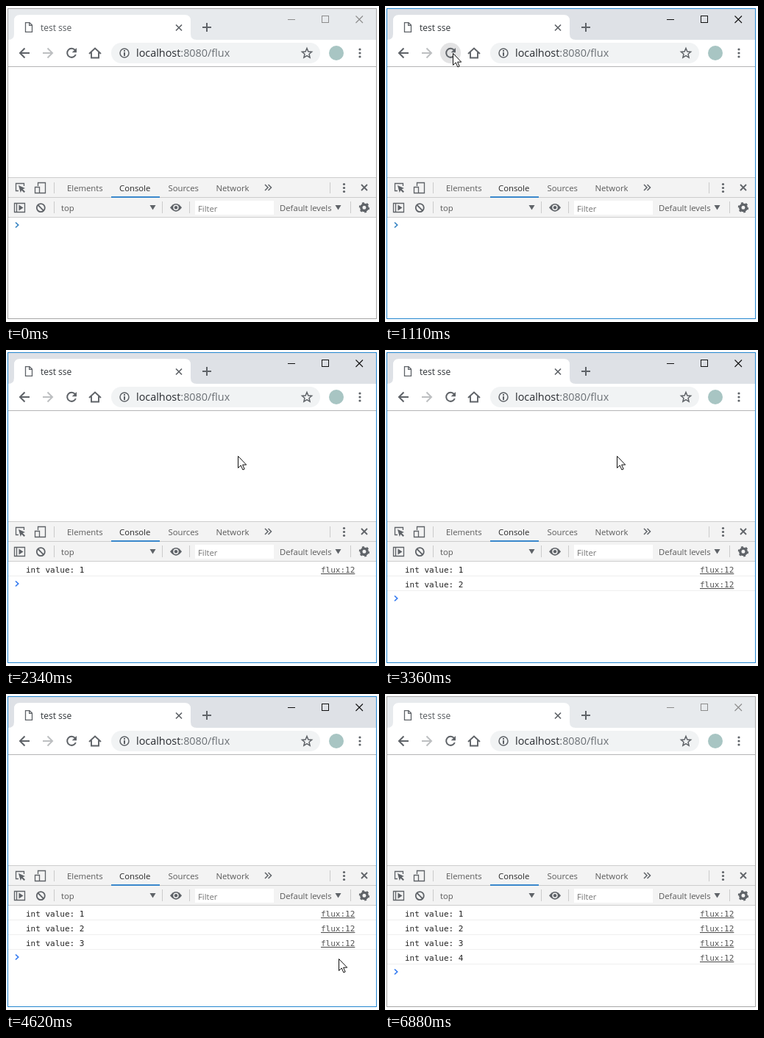
Write an HTML page that moves like this. It is 507 px wide and 430 px high and loops after 7.03 s.

```html
<!DOCTYPE html>
<html lang="en">
<head>
<meta charset="utf-8">
<title>Server-sent events console</title>
<style>
  html, body { margin: 0; width: 100%; height: 100%; overflow: hidden; background: #fff; }
  svg { display: block; width: 507px; height: 430px; --frame: #a6a6a6; --bar: #e7eaed; --control: #8c8c8c; --title: #55595d; }
  svg.active { --frame: #2486cf; --bar: #dee1e6; --control: #111; --title: #303438; }
  text { font: 11.3px "Open Sans", "Noto Sans", sans-serif; fill: #5a5a5a; white-space: pre; }
  .mono { font: 11px "DejaVu Sans Mono", monospace; fill: #222; }
  .line { fill: none; stroke: #5f6368; stroke-width: 2; }
  .thin { stroke-width: 1.3; }
  .solid { fill: #5f6368; }
  .crisp { shape-rendering: crispEdges; }
  .link { fill: #545454; text-decoration: underline; }
</style>
</head>
<body>
<svg id="stage" viewBox="0 0 507 430">
  <!-- window and tab strip -->
  <rect x="3" y="4" width="500" height="42" style="fill:var(--bar)"/>
  <path d="M3 46Q11 46 11 38V20Q11 12 19 12H243Q251 12 251 20V38Q251 46 259 46Z" fill="#fff"/>
  <path class="line thin" d="M26.5 22.6H32L35.5 26V35.4H26.5ZM31.7 22.6V26.4H35.5"/>
  <text x="47" y="34" style="font-size:12px;fill:var(--title)">test sse</text>
  <path class="line" stroke-width="1.7" d="M231 25.5L239 33.5M239 25.5L231 33.5" style="stroke-width:1.7"/>
  <path class="line" d="M267 29H279M273 23V35"/>
  <g class="crisp" fill="none" style="stroke:var(--control)">
    <path d="M383 18.5H393"/><rect x="429.5" y="13.5" width="9" height="9"/>
  </g>
  <path d="M475.5 13.5L485 23M485 13.5L475.5 23" style="stroke:var(--control)" stroke-width="1.1"/>

  <!-- address bar -->
  <path class="line" d="M32 64H19.5M25.5 57.5L19 64L25.5 70.5"/>
  <path class="line" d="M50 64H62.5M56.5 57.5L63 64L56.5 70.5" style="stroke:#bdbfc1"/>
  <circle id="halo" cx="89" cy="64" r="14" fill="#e3e3e4"/>
  <path class="line" d="M93.8 60A6 6 0 1 0 94.8 66"/>
  <path class="solid" d="M96 57V63.3H89.7Z"/>
  <path class="line" d="M113 65L121 57.5L129 65M116 63V70.5H126V63" style="stroke-width:1.9"/>
  <rect x="143" y="50" width="284" height="28" rx="14" fill="#f1f3f4"/>
  <circle class="line" cx="161" cy="64" r="6" style="stroke-width:1.5"/>
  <path class="line crisp" d="M161 60V62M161 63V68"/>
  <text x="177" y="69" style="font-size:14.4px;fill:#6b7075"><tspan fill="#282b30">localhost</tspan>:8080/flux</text>
  <path class="line" d="M409 57.5L410.9 62L415.6 62.4L412 65.5L413.1 70.2L409 67.7L404.9 70.2L406 65.5L402.4 62.4L407.1 62Z" style="stroke-width:1.5"/>
  <circle cx="449" cy="64" r="10" fill="#a8c5c3"/>
  <g class="solid"><circle cx="481" cy="59" r="1.6"/><circle cx="481" cy="64" r="1.6"/><circle cx="481" cy="69" r="1.6"/></g>
  <path class="crisp" d="M3 82.5H503" stroke="#b5b5b6"/>

  <!-- developer tools -->
  <rect x="3" y="233" width="500" height="55" fill="#f3f3f3"/>
  <path class="crisp" d="M3 233.5H503M3 260.5H503M3 287.5H503" stroke="#cdcdcd"/>
  <path class="crisp" d="M65.5 240V255M440.5 240V255M65.5 266V282M212.5 266V282M249.5 266V282M468.5 266V282" stroke="#cbcbcb"/>
  <path class="line thin" d="M17 251.5H13.5V241.5H24.5V245"/>
  <path class="solid" d="M17 244L26 248L22.7 249.2L26 252.5L24.5 254L21.2 250.7L19.8 254Z"/>
  <path class="line thin" d="M43.5 245V240.5H53.5V254.5H46M39.5 246.5H45.5V254.5H39.5Z"/>
  <text x="83" y="252">Elements</text>
  <text x="154" y="252" style="fill:#282828">Console</text>
  <text x="220.5" y="252">Sources</text>
  <text x="285.5" y="252">Network</text>
  <rect x="143" y="259" width="66" height="2" fill="#3a88cc"/>
  <path class="line" d="M352 243L356 247L352 251M356.500 243L360.500 247L356.500 251" style="stroke-width:1.5"/>
  <g class="solid"><circle cx="459.500" cy="242.500" r="1.6"/><circle cx="459.500" cy="247.500" r="1.6"/><circle cx="459.500" cy="252.500" r="1.6"/></g>
  <path class="line" d="M483 243L491 251M491 243L483 251" style="stroke-width:1.8"/>

  <path class="line thin" d="M11.500 268.500H25.500V280.500H11.500ZM14.500 268.500V280.500"/>
  <path class="solid" d="M17.500 270.500L23.500 274.500L17.500 278.500Z"/>
  <path class="line" d="M43.300 270.700L51.200 278.600" style="stroke-width:1.8"/>
  <circle class="line" cx="47.300" cy="274.600" r="5.500" style="stroke-width:1.8"/>
  <text x="75" y="279">top</text>
  <path class="solid" d="M195.500 271H203.500L199.500 277.500ZM447.500 271H455.500L451.500 277.500Z"/>
  <path class="solid" d="M223 274.300Q231 263.500 239 274.300Q231 285 223 274.300Z"/>
  <circle cx="231" cy="274.300" r="3" fill="#5f6368" stroke="#f3f3f3" stroke-width="1.400"/>
  <rect x="257" y="265" width="107" height="19" fill="#fff"/>
  <text x="261" y="280" style="fill:#757575">Filter</text>
  <text id="levels" x="372" y="279">Default levels</text>
  <circle class="line" cx="487" cy="274.300" r="4.200" style="stroke-width:3.400"/>
  <circle class="line" cx="487" cy="274.300" r="6.300" pathLength="16" stroke-dasharray="1.200 1.467" style="stroke-width:1.800"/>

  <g id="log"></g>
  <path id="prompt" d="M13 -3.500L16.700 0L13 3.500" fill="none" stroke-width="1.700"/>
  <g id="tooltip">
    <rect x="367.500" y="290.500" width="70" height="24" fill="#fff" stroke="#aaa"/>
    <text x="376.500" y="307" style="fill:#333">Log levels</text>
  </g>
  <rect class="crisp" x="2.500" y="3.500" width="501" height="422" fill="none" style="stroke:var(--frame)"/>

  <path id="arrow" d="M.5 .5V16.500L4.200 13L6.900 19L9.200 18L6.600 12.200H11.700Z" fill="#fff" stroke="#111"/>
  <path id="hand" d="M5.500 15V2Q5.500 .5 7 .5T8.500 2V7Q11 5.800 11.500 8Q13.500 7 14.300 9Q16.500 8.500 16.500 11V16Q16.500 18 14.500 20V22.500H6.500V20.500Q4 18 1.500 14Q-.3 11.300 1.700 10.500Q3 10.300 5.500 13.500M8.500 7V11.500M11.500 8V11.500M14.300 9V12" fill="#fff" stroke="#111"/>
</svg>
<script>
const LOOP = 7030;
const LOG_TIMES = [2340, 3360, 4390, 5320];
// Pointer positions: time, x, y; each one holds until the next.
const POINTER = [
  [130, 468, 413], [210, 412, 338], [280, 324, 248], [360, 232, 168], [420, 164, 116],
  [490, 116, 82], [560, 91, 67], [630, 78, 64], [720, 69, 63], [860, 79, 62], [920, 86, 62],
  [1110, 92, 64], [1260, 97, 66], [1350, 100, 67], [1490, 119, 75], [1560, 160, 96],
  [1640, 212, 121], [1730, 264, 140], [1810, 301, 148], [1880, 315, 145], [2250, 315, 144],
  [4070, 328, 161], [4140, 351, 195], [4220, 375, 226], [4390, 408, 272], [4430, 427, 315],
  [4510, 441, 341], [4580, 452, 360], [4650, 462, 377], [4730, 471, 391], [4800, 479, 402],
  [4880, 486, 411], [4950, 490, 418]
];
const POINTER_GONE = 5030;

const $ = id => document.getElementById(id);
const show = (node, visible) => node.setAttribute("visibility", visible ? "visible" : "hidden");
const move = (node, x, y) => node.setAttribute("transform", `translate(${x} ${y})`);
const between = (t, from, to) => t >= from && t < to;

$("log").innerHTML = LOG_TIMES.map((_, i) => `
  <g transform="translate(0 ${20 * i})">
    <text class="mono" x="27" y="303">int value: ${i + 1}</text>
    <text class="mono link" x="428" y="303">flux:12</text>
    <path class="crisp" d="M3 307.500H503" stroke="#efefef"/>
  </g>`).join("");
const rows = [...$("log").children];

function draw(t) {
  $("stage").classList.toggle("active", between(t, 1110, 6880));
  show($("halo"), between(t, 1110, 1490));

  const count = LOG_TIMES.filter(time => t >= time).length;
  rows.forEach((row, i) => show(row, i < count));
  move($("prompt"), 0, 298 + 20 * count);
  $("prompt").setAttribute("stroke", count ? "#367cf1" : "#3a86c4");

  $("levels").style.fill = between(t, 4390, 4510) ? "#333" : "";
  show($("tooltip"), between(t, 4430, 4510));
  $("tooltip").setAttribute("opacity", 0.3);

  const spot = POINTER.findLast(([time]) => t >= time);
  const onPage = spot && t < POINTER_GONE;
  const onLink = between(t, 4430, 4510);
  show($("arrow"), onPage && !onLink);
  show($("hand"), onPage && onLink);
  if (onPage) move(onLink ? $("hand") : $("arrow"), spot[1], spot[2]);
}

const start = performance.now();
function tick() {
  draw((performance.now() - start) % LOOP);
  requestAnimationFrame(tick);
}
tick();
</script>
</body>
</html>
```
